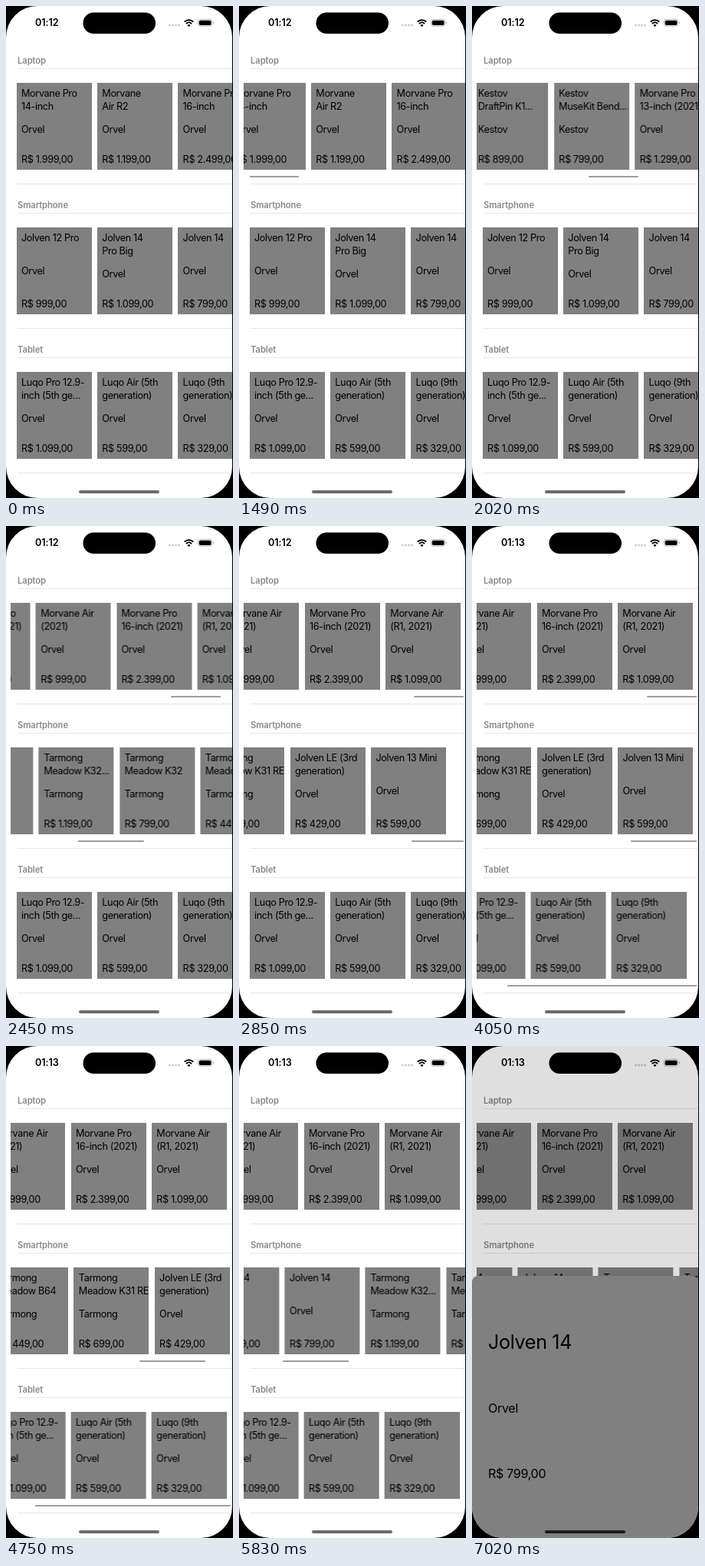
Recreate the animation shown at these times as an HTML page. Size 296 by 640 pixels, loop 8000 ms.

```html
<!DOCTYPE html>
<html lang="en">
<head>
<meta charset="utf-8">
<title>Product shelves</title>
<style>
  html, body { margin: 0; width: 100%; height: 100%; overflow: hidden; background: #000; }
  body { font: 12.7px/16.5px Inter, Roboto, sans-serif; letter-spacing: -.03em; color: #000; }
  div { position: absolute; white-space: pre; }
  #phone { width: 295px; height: 640px; border-radius: 41px; overflow: hidden; background: #fff; }
  #clock { left: 38px; top: 14px; font-weight: 600; letter-spacing: -.01em; }
  #status { position: absolute; left: 0; top: 0; }
  .heading { left: 15px; font-size: 11.3px; font-weight: 600; letter-spacing: -.01em; color: #8a8a8d; }
  .line { left: 15px; right: 0; height: 1px; background: #e6e6e6; }
  .shelf { left: 6px; width: 289px; height: 124px; overflow: hidden; }
  .strip { left: 0; top: 0; will-change: transform; }
  .card { top: 0; width: 98px; height: 113px; background: #808080; }
  .card div { left: 6.5px; }
  .thumb { top: 121px; height: 2px; border-radius: 1px; background: #9d9d9d; }
  #dim { inset: 0; background: #000; }
  #sheet { left: 0; top: 0; width: 295px; height: 342px; border-radius: 8px 8px 0 0; background: #808080; font-size: 16.2px; }
  #sheet div { left: 21px; line-height: 30px; }
  #home { left: 95px; top: 630px; width: 105px; height: 4px; border-radius: 2px; }
</style>
</head>
<body>
<div id="phone">
  <div id="clock"></div>
  <svg id="status" width="295" height="44">
    <rect x="100.5" y="8.5" width="94.5" height="27.5" rx="13.75"/>
    <g fill="#c9c9c9">
      <circle cx="213.5" cy="25" r="1.4"/><circle cx="217.5" cy="25" r="1.4"/>
      <circle cx="221.5" cy="25" r="1.4"/><circle cx="225.5" cy="25" r="1.4"/>
    </g>
    <g fill="none" stroke="#000" stroke-width="1.9">
      <path d="M232.7 20.6a8.2 8.2 0 0 1 11.6 0M234.9 23a5.1 5.1 0 0 1 7.2 0"/>
    </g>
    <path d="M238.5 27l-2-2.1a2.9 2.9 0 0 1 4 0z"/>
    <rect x="250.4" y="17.4" width="18.4" height="8.8" rx="2.8" fill="none" stroke="#aaa" stroke-width=".8"/>
    <rect x="251.7" y="18.7" width="15.8" height="6.2" rx="1.7"/>
    <path d="M270 20.3a1.7 1.7 0 0 1 0 3z" fill="#aaa"/>
  </svg>
  <div id="dim"></div>
  <div id="sheet"></div>
  <div id="home"></div>
</div>
<script>
const LOOP = 8000, PITCH = 105.3, VIEW = 289, TRACK = 285;
const phone = document.getElementById('phone');
const [clock, dim, sheet, home] = ['clock', 'dim', 'sheet', 'home'].map(id => document.getElementById(id));

// items: [name, brand, price]; scroll and fade: [ms, value] points
const shelves = [
  {
    title: 'Laptop',
    items: [
      ['Morvane Pro\n14-inch', 'Orvel', '1.999'], ['Morvane\nAir R2', 'Orvel', '1.199'],
      ['Morvane Pro\n16-inch', 'Orvel', '2.499'], ['Morvane Pro\n13-inch', 'Orvel', '1.299'],
      ['Morvane Air\n13-inch', 'Orvel', '999'], ['Kestov\nSlatePin X2', 'Kestov', '1.099'],
      ['Kestov\nDraftPin K1...', 'Kestov', '899'], ['Kestov\nMuseKit Bend...', 'Kestov', '799'],
      ['Morvane Pro\n13-inch (2021)', 'Orvel', '1.299'], ['Morvane Air\n(2021)', 'Orvel', '999'],
      ['Morvane Pro\n16-inch (2021)', 'Orvel', '2.399'], ['Morvane Air\n(R1, 2021)', 'Orvel', '1.099'],
    ],
    scroll: [[1400, 0], [1490, 25], [1700, 250], [2020, 645.6], [2230, 840], [2550, 960], [2850, 981], [3250, 982]],
    fade: [[1400, 0], [1490, 1], [4560, 1], [4740, 0]],
  },
  {
    title: 'Smartphone',
    items: [
      ['Jolven 12 Pro', 'Orvel', '999'], ['Jolven 14\nPro Big', 'Orvel', '1.099'], ['Jolven 14', 'Orvel', '799'],
      ['Tarmong\nMeadow K32...', 'Tarmong', '1.199'], ['Tarmong\nMeadow K32', 'Tarmong', '799'],
      ['Tarmong\nMeadow B64', 'Tarmong', '449'], ['Tarmong\nMeadow K31 RE', 'Tarmong', '699'],
      ['Jolven LE (3rd\ngeneration)', 'Orvel', '429'], ['Jolven 13 Mini', 'Orvel', '599'],
    ],
    scroll: [[2130, 0], [2230, 30], [2350, 150], [2650, 560], [2850, 684], [3050, 672], [3150, 666],
      [4540, 666], [4620, 640], [4750, 557], [5290, 185], [5570, 172], [5830, 164.6]],
    fade: [[2130, 0], [2230, 1], [6360, 1], [6500, 0]],
  },
  {
    title: 'Tablet',
    items: [
      ['Luqo Pro 12.9-\ninch (5th ge...', 'Orvel', '1.099'], ['Luqo Air (5th\ngeneration)', 'Orvel', '599'],
      ['Luqo (9th\ngeneration)', 'Orvel', '329'],
    ],
    scroll: [[3060, 0], [3150, -6], [3470, -26.5], [3620, -20], [3850, 20], [4100, 50], [4460, 34.4]],
    fade: [[3060, 0], [3150, 1], [5250, 1], [5600, 0]],
  },
];

// The picture advances in steps: [first, last, count]
const steps = [0, ...[[1490, 2230, 8], [2350, 3150, 9], [3250, 3470, 3], [3620, 4350, 8], [4460, 4460, 1],
  [4620, 4620, 1], [4750, 5290, 6], [5570, 5830, 3], [6370, 6800, 5], [7020, 7020, 1]]
  .flatMap(([first, last, count]) =>
    Array.from({ length: count }, (_, i) => first + (last - first) * i / Math.max(1, count - 1)))];

const clamp = x => Math.min(1, Math.max(0, x));

function at(points, t) {
  const i = points.findIndex(p => p[0] > t);
  if (i === 0) return points[0][1];
  if (i < 0) return points[points.length - 1][1];
  const [[t0, a], [t1, b]] = [points[i - 1], points[i]];
  return a + (b - a) * (t - t0) / (t1 - t0);
}

function add(parent, className, top, text = '') {
  const el = document.createElement('div');
  el.className = className;
  el.style.top = top + 'px';
  el.textContent = text;
  parent.append(el);
  return el;
}

function buildShelf(shelf, index) {
  const top = 100 + index * 188;
  const section = add(phone, '', 0);
  section.style.cssText = 'left:0;top:0;width:295px';
  add(section, 'heading', top - 37, shelf.title);
  add(section, 'line', top - 19);
  add(section, 'line', top + 131);
  const view = add(section, 'shelf', top);
  shelf.strip = add(view, 'strip', 0);
  shelf.items.forEach(([name, brand, price], i) => {
    const card = add(shelf.strip, 'card', 0);
    card.style.left = 7.5 + i * PITCH + 'px';
    add(card, '', 6, name);
    add(card, '', name.includes('\n') ? 53 : 49, brand);
    add(card, '', 91.5, `R$ ${price},00`);
  });
  shelf.thumb = add(view, 'thumb', 121);
  shelf.content = shelf.items.length * PITCH + 7.5;
  phone.insertBefore(section, dim);
}

function drawShelf({ strip, thumb, content, scroll, fade }, t) {
  const offset = at(scroll, t), max = content - VIEW;
  const inside = Math.min(max, Math.max(0, offset));
  const full = TRACK * VIEW / content;
  const width = full - Math.abs(offset - inside);
  const left = offset > max ? 2 + TRACK - width : 2 + (TRACK - full) * inside / max;
  strip.style.transform = `translateX(${-offset}px)`;
  thumb.style.left = left + 'px';
  thumb.style.width = width + 'px';
  thumb.style.opacity = at(fade, t);
}

function draw(time) {
  const t = steps.filter(s => s <= time + .5).pop();
  shelves.forEach(shelf => drawShelf(shelf, t));
  clock.textContent = t < 3000 ? '01:12' : '01:13';
  const rise = 1 - (1 - clamp((t - 6300) / 720)) ** 4;
  sheet.style.transform = `translateY(${640 - 341 * rise}px)`;
  dim.style.opacity = .125 * rise;
  home.style.background = rise > .3 ? '#1c1c1c' : '#6b6b6b';
}

shelves.forEach(buildShelf);
add(sheet, '', 71, 'Jolven 14').style.fontSize = '25.2px';
add(sheet, '', 157, 'Orvel');
add(sheet, '', 242, 'R$ 799,00');

const start = performance.now();
function tick() {
  draw((performance.now() - start) % LOOP);
  requestAnimationFrame(tick);
}
tick();
</script>
</body>
</html>
```
